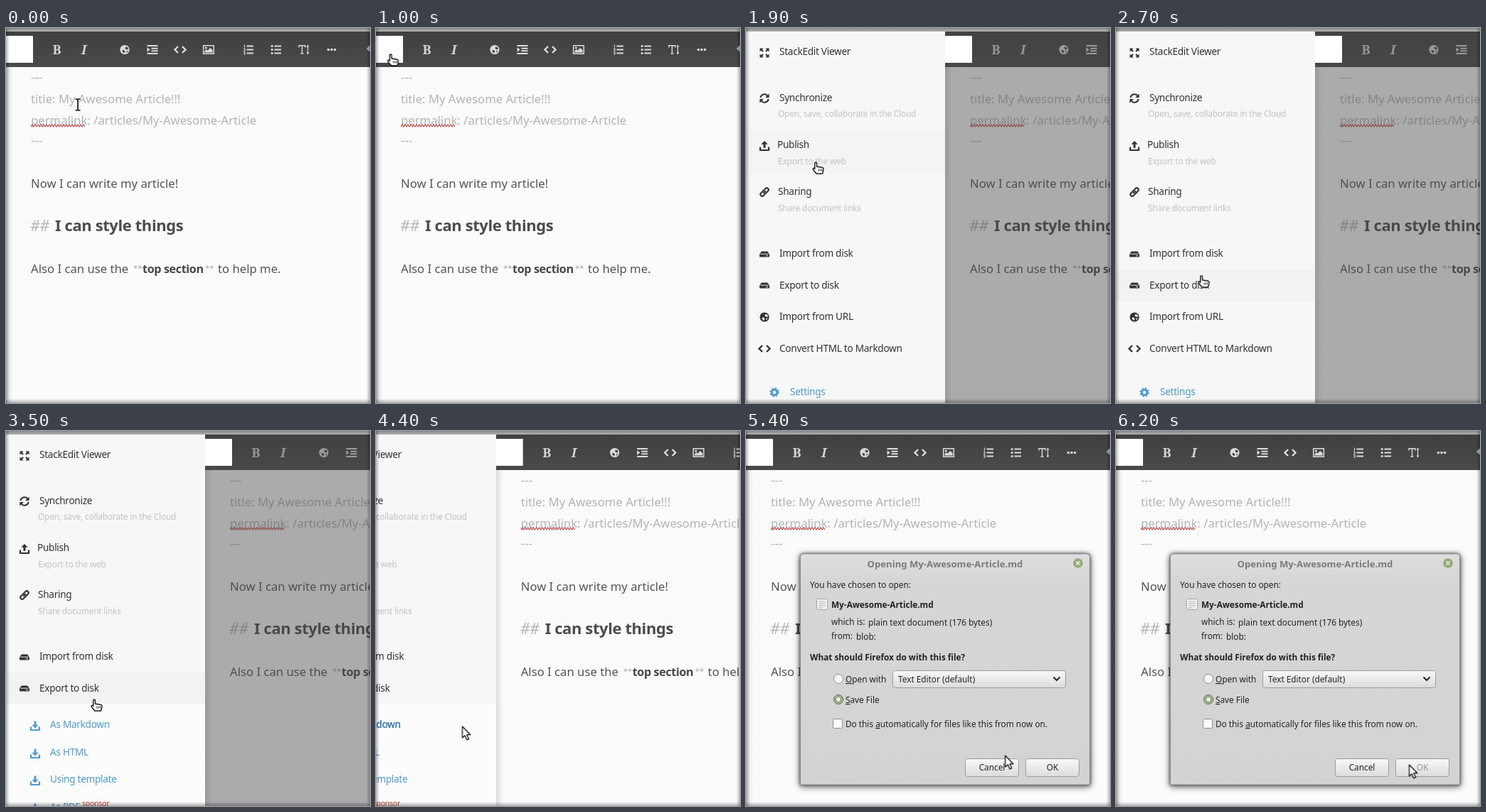
These frames come from a looping animation (512x528 px, 6.3 s). An HTML page:

```html
<!DOCTYPE html>
<html lang="en">
<head>
<meta charset="utf-8">
<title>Export an article to disk</title>
<style>
  html, body { margin: 0; width: 100%; height: 100%; overflow: hidden; background: #fbfbfc; }
  svg { display: block; width: 512px; height: 528px; }
  text { white-space: pre; font-family: "Noto Sans", "Open Sans", sans-serif; }
  .edit { font-size: 16.7px; fill: #555; }
  .meta { fill: #b4b4b4; }
  .head { font-size: 22px; font-weight: 700; letter-spacing: -.4px; fill: #4c4c4c; }
  .hash { font-size: 21px; font-style: italic; }
  .strong { font-size: 16.2px; font-weight: 700; letter-spacing: -.4px; fill: #484848; }
  .star { font-size: 11.5px; fill: #a8a8a8; }
  .tool { font: 700 18px "Noto Serif", serif; fill: #d4d4d4; }
  .slant { font-style: italic; }
  .item { font-size: 13.6px; letter-spacing: -.28px; fill: #333; }
  .hint { font-size: 12px; letter-spacing: -.25px; fill: #c4c4c4; }
  .blue { fill: #4f9bd0; }
  .dark { fill: #2a6ea6; }
  .note { font-size: 10.5px; letter-spacing: -.25px; fill: #c0443c; }
  .dlg { font-size: 11.8px; fill: #222; }
  .bold { font-weight: 700; }
  .bar { font-size: 13.1px; font-weight: 700; fill: #7b7b7b; }
  .mid { text-anchor: middle; }
  .off { fill: #999; }
  .u { text-decoration: underline; }
  #dialog { filter: drop-shadow(0 0 2px rgba(0, 0, 0, .55)) drop-shadow(0 2px 5px rgba(0, 0, 0, .6)); }
</style>
</head>
<body>
<svg id="stage" viewBox="0 0 512 528" xmlns="http://www.w3.org/2000/svg"></svg>
<script>
const LOOP = 6300, TICK = 100;
const stage = document.getElementById('stage');
const $ = id => document.getElementById(id);

const text = (x, y, cls, str) => `<text x="${x}" y="${y}" class="${cls}">${str}</text>`;
const rect = (x, y, w, h, fill, more = '') =>
  `<rect x="${x}" y="${y}" width="${w}" height="${h}" fill="${fill}" ${more}/>`;
const path = (d, more = '') => `<path d="${d}" ${more}/>`;
const line = (d, w = 2) => path(d, `fill="none" stroke="currentColor" stroke-width="${w}"`);
const turn = (deg, body) => `<g transform="rotate(${deg})">${body}</g>`;
const group = (id, body) => `<g id="${id}">${body}</g>`;
const fade = (id, dir, ...stops) =>
  `<linearGradient id="${id}" x2="${dir === 'x' ? 1 : 0}" y2="${dir === 'y' ? 1 : 0}">` +
  stops.map(([at, color, alpha = 1]) =>
    `<stop offset="${at}" stop-color="${color}" stop-opacity="${alpha}"/>`).join('') +
  '</linearGradient>';

const tray = line('M-6 1.5v4.5h12v-4.5', 2.2);
const bars = line('M-2.5-5h9.5M-2.5 0h9.5M-2.5 5h9.5', 2);
const icons = {
  expand: [0, 90, 180, 270].map(a =>
    turn(a, path('M-6.5-6.5h5l-1.7 1.7 2 2-1.6 1.6-2-2-1.7 1.7z'))).join(''),
  sync: [0, 180].map(a => turn(a,
    line('M-5.6-1A5.6 5.6 0 0 1 4.2-3.8') + path('M6.6-6.6v5.6h-5.6z'))).join(''),
  upload: tray + path('M0-7l4.7 4.7h-3.2v5h-3v-5h-3.2z'),
  download: tray + path('M0 3.5l-4.7-4.7h3.2v-5.3h3v5.3h3.2z'),
  link: turn(-45,
    line('M1 2.5h-5.5a2.5 2.5 0 0 1 0-5h3.5M-1-2.5h5.5a2.5 2.5 0 0 1 0 5h-3.5M-2.5 0h5', 2.1)),
  disk: path('M-7 1l2-3.6q.4-.9 1.4-.9h7.2q1 0 1.4.9l2 3.6v2.6q0 1-1 1h-12q-1 0-1-1z') +
    path('M-5.5.2h11M2 2.7h3', 'stroke="#eee" stroke-width="1"'),
  globe: path('M-6.6 0a6.6 6.6 0 0 1 13.2 0a6.6 6.6 0 0 1-13.2 0z' +
    'M1-4l3 .5 1 2.5-2 1-2.5-1.5zM-4 1l3-.5 1.5 2-1.5 2.5-1.5-1.5zM2 2l2.5-.5-1.5 3z',
    'fill-rule="evenodd"'),
  code: line('M-3-4.5l-4.5 4.5 4.5 4.5M3-4.5l4.5 4.5-4.5 4.5', 2.4),
  cog: '<circle r="3.7" fill="none" stroke="currentColor" stroke-width="3"/>' +
    '<circle r="5.7" fill="none" stroke="currentColor" stroke-width="2" stroke-dasharray="2.4 2.08"/>',
  indent: line('M-7.5-5.5h15M-1.5-1.8h9M-1.5 1.8h9M-7.5 5.5h15', 2) + path('M-7.5-3.2l4.3 3.2-4.3 3.2z'),
  image: line('M-7.3-5.7h14.6v11.4h-14.6z', 1.5) +
    '<circle cx="-3.7" cy="-2.5" r="1.5"/>' + path('M-5.6 4v-2l2.5-2.4 1.7 1.6 3.6-3.8 3.4 3.4v3.2z'),
  numbers: bars + line('M-5.5-7v4M-7-1.5h2v3h-2M-7 3.5h2v3h-2', 1.1),
  bullets: bars + [-5, 0, 5].map(y => `<circle cx="-5.8" cy="${y}" r="1.6"/>`).join(''),
  height: line('M-7-3v-2.7h9v2.7M-2.5-5.5v11M-4.5 5.5h4', 1.4) +
    line('M5.5-5v10', 1.2) + path('M5.5-7l2 3h-4zM5.5 7l2-3h-4z'),
  dots: [-4.6, 0, 4.6].map(x => rect(x - 1.6, -1.6, 3.2, 3.2, 'currentColor', 'rx=".7"')).join('')
};
const icon = (name, x, y, color = '#333') =>
  `<g transform="translate(${x} ${y})" color="${color}" fill="${color}">${icons[name]}</g>`;

// Editor
const toolbar = [['globe', 167], ['indent', 206], ['code', 245], ['image', 285],
  ['numbers', 341], ['bullets', 380], ['height', 419], ['dots', 458]];
const squiggle = 'M35 139' + 'l2-3 2 3'.repeat(19);
const editor =
  rect(0, 0, 512, 528, '#fbfbfc') +
  rect(0, 5, 512, 50, 'url(#tools)') +
  text(65.5, 37, 'tool', 'B') +
  text(106, 37, 'tool slant', 'I') +
  toolbar.map(([name, x]) => icon(name, x, 30.5, '#dcdcdc')).join('') +
  path('M507 29l5-5v10z', 'fill="#a9b8c6"') +
  text(35, 75, 'edit meta', '---') +
  text(35, 106, 'edit meta', 'title: My Awesome Article!!!') +
  text(35, 136, 'edit meta', 'permalink: /articles/My-Awesome-Article') +
  path(squiggle, 'fill="none" stroke="#c23c3c" stroke-width="1.1"') +
  text(35, 164, 'edit meta', '---') +
  text(35, 225, 'edit', 'Now I can write my article!') +
  text(34, 286, 'hash meta', '##') +
  text(69, 286, 'head', 'I can style things') +
  text(35, 345, 'edit', 'Also I can use the') +
  text(179, 342, 'star', '**') +
  text(192, 345, 'strong', 'top section') +
  text(280, 342, 'star', '**') +
  text(298, 345, 'edit', 'to help me.') +
  rect(0, 55, 10, 473, 'url(#edge)') +
  '<rect id="dim" y="5" width="512" height="523" fill="#464644" opacity="0"/>' +
  rect(0, 11, 38, 38, '#fff');

// Side menu
const entry = (name, x, y, label, dy = 1) => icon(name, 26, y + dy) + text(x, y + 5, 'item', label);
const subEntry = (y, label) =>
  icon('download', 41, y + 2, '#4f9bd0') + text(62, y + 5, 'item blue', label);
const menu =
  rect(0, 5, 280, 523, '#f7f7f7') +
  group('overPublish', rect(0, 142, 280, 64, '#f4f4f4')) +
  group('overExport', rect(0, 340, 280, 44, '#f2f2f2')) +
  entry('expand', 47, 33, 'StackEdit Viewer', 2) +
  entry('sync', 47, 98, 'Synchronize') +
  text(45, 125, 'hint', 'Open, save, collaborate in the Cloud') +
  entry('upload', 44, 164, 'Publish', 2) +
  text(45, 192, 'hint', 'Export to the web') +
  entry('link', 45, 230, 'Sharing') +
  text(45, 258, 'hint', 'Share document links') +
  entry('disk', 47, 317, 'Import from disk') +
  entry('disk', 47, 362, 'Export to disk', 0) +
  rect(0, 384, 280, 144, '#fcfcfc') +
  subEntry(413, 'As Markdown') +
  group('overMarkdown', text(62, 418, 'item dark', 'As Markdown')) +
  subEntry(452, 'As HTML') +
  subEntry(490, 'Using template') +
  subEntry(529, 'As PDF') + text(107, 528, 'note', 'sponsor') +
  group('rest',
    rect(0, 384, 280, 160, '#f7f7f7') +
    entry('globe', 47, 406, 'Import from URL') +
    entry('code', 47, 451, 'Convert HTML to Markdown', 0.5) +
    icon('cog', 40, 513, '#4f9bd0') + text(62, 517, 'item blue', 'Settings'));

// Save dialog
const button = x => rect(x + .5, 461.5, 75, 25, 'url(#button)', 'rx="3" stroke="#9c9c9c"');
const radio = (y, fill, stroke) => `<circle cx="130" cy="${y}" r="6.5" fill="${fill}" stroke="${stroke}"/>`;
const u = s => `<tspan class="u">${s}</tspan>`;
const dialog =
  path('M76.5 498v-321q0-4 4-4h399q4 0 4 4v321z', 'fill="url(#window)" stroke="#8e8e8e"') +
  text(280, 192, 'bar mid', 'Opening My-Awesome-Article.md') +
  '<circle cx="467" cy="186" r="6.8" fill="#93ac78"/>' +
  path('M464.5 183.5l5 5m0-5l-5 5', 'stroke="#eef2e8" stroke-width="1.6"') +
  text(90, 221, 'dlg', 'You have chosen to open:') +
  rect(99.5, 236.5, 15, 15, '#f4f4f4', 'rx="2" stroke="#a2a2a2"') +
  path('M102 240h10m-10 3h10m-10 3h10m-10 3h6', 'stroke="#aaa"') +
  text(120, 249, 'dlg bold', 'My-Awesome-Article.md') +
  text(120, 273, 'dlg', 'which is:') +
  text(172, 274, 'dlg', 'plain text document (176 bytes)') +
  text(120, 293, 'dlg', 'from:') +
  text(155, 294, 'dlg', 'blob:') +
  text(90, 323, 'dlg bold', 'What should Firefox do with this file?') +
  radio(349, '#fafafa', '#8f8f8f') + text(140, 354, 'dlg', u('O') + 'pen with') +
  rect(206.5, 337.5, 243, 24, 'url(#button)', 'rx="3" stroke="#9c9c9c"') +
  text(214, 354, 'dlg', 'Text Editor (default)') +
  path('M432.5 346.5l4.5 4.5 4.5-4.5', 'fill="none" stroke="#222" stroke-width="2"') +
  radio(378, '#a9bf90', '#56634a') +
  '<circle cx="130" cy="378" r="3.6" fill="#fafafa" stroke="#66745a"/>' +
  text(140, 383, 'dlg', u('S') + 'ave File') +
  rect(122.5, 405.5, 13, 13, '#fafafa', 'rx="2" stroke="#8f8f8f"') +
  text(140, 417, 'dlg', 'Do this ' + u('a') + 'utomatically for files like this from now on.') +
  button(308) + text(346, 478, 'dlg mid', 'Cancel') +
  button(393) +
  group('okOn', text(431, 478, 'dlg mid', 'OK')) +
  group('okOff', text(431, 478, 'dlg mid off', 'OK'));

// Pointers, each with its hot spot at 0,0
const caret = 'M-3.5-8h2.5l1 1 1-1h2.5M-3.5 8h2.5l1-1 1 1h2.5M0-7v14';
const pointers =
  group('beam',
    path(caret, 'fill="none" stroke="#fff" stroke-width="3.6"') +
    path(caret, 'fill="none" stroke="#111" stroke-width="1.7"')) +
  group('arrow', path('M0 0v16l3.7-3.3 2.7 6.2 2.7-1.2-2.7-6h5z',
    'fill="#fff" stroke="#111" stroke-width="1.3" stroke-linejoin="round"')) +
  group('hand',
    path('M-1.3 1.5q0-1.5 1.4-1.5t1.4 1.5v4.5l7.5 1.2q2 .4 2 2.3l-.7 4-1 2.5h-8.3l-4.4-5.3q-1.2-1.6 0-2.3t2.1 1z',
      'fill="#fff" stroke="#111" stroke-width="1.4" stroke-linejoin="round"') +
    path('M4 9.5v3M6.3 9.5v3M8.6 9.5v3', 'stroke="#111"'));

stage.innerHTML =
  '<defs>' +
  fade('tools', 'y', [0, '#404040'], [1, '#4a4a4a']) +
  fade('top', 'y', [0, '#868686'], [1, '#b2b2b2']) +
  fade('window', 'y', [0, '#dedede'], [.12, '#d6d6d6'], [1, '#d3d3d3']) +
  fade('button', 'y', [0, '#f8f8f8'], [1, '#dcdcdc']) +
  fade('edge', 'x', [0, '#000', .13], [1, '#000', 0]) +
  fade('left', 'x', [0, '#000', .28], [1, '#000', 0]) +
  fade('right', 'x', [0, '#000', 0], [1, '#000', .28]) +
  fade('bottom', 'y', [0, '#000', 0], [1, '#000', .3]) +
  '</defs>' +
  group('panel', editor) + group('menu', menu) +
  rect(0, 0, 512, 5, 'url(#top)') +
  rect(0, 0, 5, 528, 'url(#left)') + rect(507, 0, 5, 528, 'url(#right)') +
  rect(0, 522, 512, 6, 'url(#bottom)') +
  group('dialog', dialog) + group('pointer', pointers);

// Motion: every track is a list of [ms, value, easing to the next step]
const tracks = [];
function track(id, prop, steps, ease = 'linear') {
  const all = [...steps, [LOOP, steps[steps.length - 1][1]]];
  if (all[0][0] > 0) all.unshift([0, all[0][1]]);
  const frames = all.map(([ms, value, easing = ease]) => ({ offset: ms / LOOP, [prop]: value, easing }));
  const a = $(id).animate(frames, { duration: LOOP, iterations: Infinity });
  a.pause();
  tracks.push(a);
}
const move = (x, y) => `translate(${x}px, ${y}px)`;
const show = (id, ...spans) => track(id, 'opacity',
  [[0, 0], ...spans.flatMap(([from, to]) => [[from, 1], [to, 0]])].filter(([ms], i, all) =>
    ms < LOOP && !(i === 0 && all[1][0] === 0)), 'step-end');
const slide = (id, base) => track(id, 'transform', [
  [1200, move(base, 0), 'ease-in-out'], [1600, move(base + 280, 0)],
  [4225, move(base + 280, 0), 'ease-in-out'], [4625, move(base, 0)]]);

slide('panel', 0);
slide('menu', -280);
track('dim', 'opacity', [[1200, 0], [1375, .44], [4225, .44, 'step-end'], [4300, 0]]);
track('rest', 'transform', [[2950, move(0, 0), 'ease'], [3300, move(0, 170)]]);
track('pointer', 'transform', [
  [0, 101, 108], [100, 101, 108], [500, 52, 60], [700, 21, 38], [1300, 20, 36],
  [1500, 30, 60], [1900, 98, 189], [2200, 104, 222], [2500, 116, 310], [2800, 122, 368],
  [3500, 124, 378], [3700, 124, 392], [4000, 121.5, 416], [4800, 121.5, 416],
  [5100, 230, 436], [5400, 364.5, 457], [5700, 408, 468], [6200, 412.5, 470]
].map(([ms, x, y]) => [ms, move(x, y)]));

show('beam', [0, 500]);
show('arrow', [500, 600], [4300, LOOP]);
show('hand', [600, 4300]);
show('overPublish', [1800, 2100]);
show('overExport', [2700, 3800]);
show('overMarkdown', [3800, 4700]);
show('dialog', [4800, LOOP]);
show('okOn', [5300, 6100]);
show('okOff', [0, 5300], [6100, LOOP]);

const start = performance.now();
function draw() {
  const t = (performance.now() - start + 8) % LOOP;
  const now = Math.floor(t / TICK) * TICK + 1;
  for (const a of tracks) a.currentTime = now;
  requestAnimationFrame(draw);
}
draw();
</script>
</body>
</html>
```
